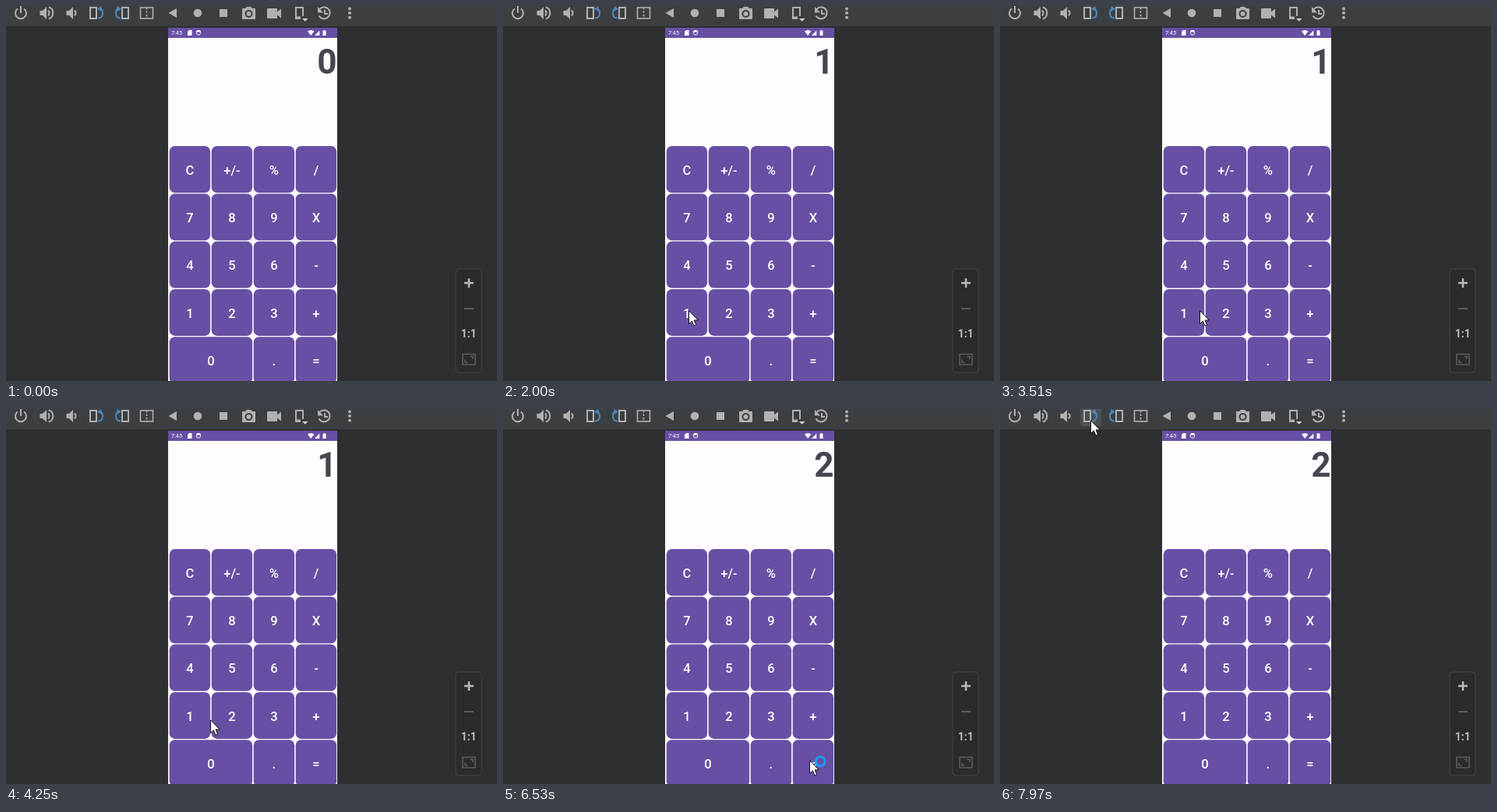
Recreate the animation shown at these times as an HTML page. Size 630 by 482 pixels, loop 8000 ms.

```html
<!DOCTYPE html>
<html lang="en">
<head>
<meta charset="utf-8">
<title>Calculator</title>
<style>
  html, body { margin: 0; width: 100%; height: 100%; overflow: hidden; background: #2e2f30; }
  svg { display: block; width: 100vw; height: 100vh; }
  text { font-family: Roboto, sans-serif; }
  .line { fill: none; stroke: #afb1b3; stroke-width: 2; }
  .solid { fill: #afb1b3; }
  .blue { fill: none; stroke: #4a88c2; stroke-width: 2; }
  .blueFill { fill: #4a88c2; }
  .dim { fill: none; stroke: #5b5c5e; stroke-width: 1.6; }
  #keys rect { fill: #6750a4; }
  #keys text { fill: #fff; font-size: 16.5px; font-weight: 500; text-anchor: middle; }
</style>
</head>
<body>
<svg viewBox="0 0 630 482">
  <defs>
    <radialGradient id="spot">
      <stop offset="0" stop-color="#fff" stop-opacity=".5"/>
      <stop offset=".8" stop-color="#fff" stop-opacity=".4"/>
      <stop offset="1" stop-color="#fff" stop-opacity=".1"/>
    </radialGradient>
    <path id="speaker" d="M0 6h3.5l5-5v16l-5-5H0z"/>
    <g id="turn">
      <rect class="line" x="108" y="2" width="8" height="14"/>
      <path class="blue" d="M118 15.5c4.500 0 6-2.500 6-6.500 0-2.500-1-4.500-3-5.500"/>
      <path class="blueFill" d="M117 3.500l5.500-3.500v7z"/>
    </g>
  </defs>

  <rect width="630" height="26" fill="#3c3f41"/>
  <rect id="hover" x="103" y="-4" width="27" height="26" rx="3" fill="#4c5052"/>

  <g id="toolbar">
    <path class="line" d="M15 3.500a7 7 0 1 0 8 0M19 0v9"/>
    <use href="#speaker" class="solid" x="43.500"/>
    <path class="line" stroke-width="1.500" d="M54 5.500q3 3.500 0 7M55 1.500c7 2 7 13 0 15"/>
    <use href="#speaker" class="solid" x="77.500"/>
    <path class="line" d="M88 5.500q3 3.500 0 7"/>
    <use href="#turn"/>
    <use href="#turn" transform="matrix(-1 0 0 1 265 0)"/>
    <rect class="line" style="stroke-width:1.600" x="172.500" y="2" width="16" height="14"/>
    <path class="line" style="stroke-width:1.600" stroke-dasharray="2.500 2" d="M180.500 2v14"/>
    <path class="solid" d="M208.500 9l10.500-6v12z"/>
    <circle class="solid" cx="246" cy="9" r="5.300"/>
    <rect class="solid" x="274" y="4" width="10" height="10"/>
    <path class="solid" fill-rule="evenodd" d="M304 3h3l2-2h5l2 2h3q1 0 1 1v12q0 1-1 1h-15q-1 0-1-1V4q0-1 1-1zM311.500 5a5 5 0 1 0 .01 0z"/>
    <circle class="solid" cx="311.500" cy="10" r="3"/>
    <path class="solid" d="M336 3h11q1 0 1 1v3.500l5-4v12l-5-4V15q0 1-1 1h-11q-1 0-1-1V4q0-1 1-1z"/>
    <path class="line" d="M378 16h-6V2h9v11"/>
    <path class="line" d="M371 14.500h7"/>
    <path fill="#d0d1d2" d="M380 16h7.500l-3.750 3.800z"/>
    <path class="line" d="M402 4.500a7.500 7.500 0 1 1-.5 8M409 5v5h4"/>
    <path class="solid" d="M400 1v7.500h7z"/>
    <g class="solid"><circle cx="441" cy="3.500" r="2"/><circle cx="441" cy="9" r="2"/><circle cx="441" cy="14.700" r="2"/></g>
  </g>

  <rect x="208" y="28" width="217" height="454" fill="#fffbff"/>
  <rect x="208" y="28" width="217" height="13" fill="#6750a4"/>
  <g fill="#fff">
    <text x="212" y="37" font-size="7.300">7:45</text>
    <path d="M235 31h3.500v7H233v-5z"/>
    <circle cx="247" cy="34.500" r="2.700" fill="none" stroke="#fff"/>
    <path d="M244 33.500h6v-1l-1.500-1.500h-3l-1.500 1.500z"/>
    <path d="M387 32.500q4.200-3 8.400 0l-4.200 5.500zM396 38l6.300-6.500V38zM406.500 32h1v-1h2v1h1v6h-4z"/>
  </g>
  <text id="display" x="424.500" y="86.500" font-size="44" font-weight="700" text-anchor="end" fill="#49454f">0</text>
  <g id="keys"></g>

  <rect x="577" y="338" width="33" height="133" rx="4" fill="#2b2b2c" stroke="#434547"/>
  <path d="M588 356h12M594 350v12" stroke="#b9babb" stroke-width="2.500"/>
  <path d="M588 389h12" class="dim" style="stroke-width:2"/>
  <text x="593.700" y="426" font-size="14" font-weight="700" text-anchor="middle" fill="#b9babb">1:1</text>
  <path class="dim" d="M586 447.500h16v13.500h-16zM595.500 450.500h3.500v3.500M592.500 458h-3.500v-3.500"/>

  <circle id="tap" r="15" fill="url(#spot)"/>
  <g id="cursor">
    <path d="M.5.8v16.700l3.800-3.600 2.700 6.200 2.700-1.200-2.600-6h5.200z" fill="#fff" stroke="#000" stroke-width=".9"/>
    <circle id="busy" cx="14.200" cy="2" r="5.900" fill="none" stroke="#1e9bf0" stroke-width="3"/>
  </g>
</svg>
<script>
const LOOP = 8000;
const $ = id => document.getElementById(id);

// Keypad
const keyRows = [["C", "+/-", "%", "/"], [7, 8, 9, "X"], [4, 5, 6, "-"], [1, 2, 3, "+"], [0, null, ".", "="]];
$("keys").innerHTML = keyRows.map((row, r) => row.map((label, c) => {
  if (label === null) return "";
  const w = label === 0 ? 106.4 : 52.4, x = 209.7 + c * 54, y = 180 + r * 61.3;
  return `<rect x="${x}" y="${y}" width="${w}" height="60" rx="7"/>` +
    `<text x="${x + w / 2}" y="${y + 36.6}">${label}</text>`;
}).join("")).join("");

// Pointer moves: first step, last step, number of steps, destination
const entry = [517, 483];
const moves = [
  [560, 840, 5, 318, 409],
  [1100, 1650, 8, 238, 391],
  [2260, 2670, 7, 394, 387],
  [3230, 3510, 5, 256, 391],
  [3580, 3650, 2, 238, 389],
  [4250, 4880, 10, 393, 451],
  [6860, 7140, 5, 181, 192],
  [7410, 7970, 9, 116, 14]
];
// Presses: down, up, gone
const taps = [[1790, 1930, 2000], [2740, 2880, 2950], [3720, 3850, 3920], [5870, 6000, 6070]];

const ease = p => Math.sin(p * Math.PI / 2);
const within = (t, a, b) => t >= a && t < b;
const show = (el, on) => el.setAttribute("visibility", on ? "visible" : "hidden");

function pointer(t) {
  let [x, y] = entry;
  for (const [start, end, steps, toX, toY] of moves) {
    if (t < start) break;
    const step = Math.min(steps - 1, Math.floor((t - start) / (end - start) * (steps - 1) + 0.01));
    const p = ease((step + 1) / steps);
    x += (toX - x) * p;
    y += (toY - y) * p;
  }
  return [Math.round(x), Math.round(y)];
}

function draw(t) {
  const [x, y] = pointer(t);
  const tap = taps.find(([down, , gone]) => within(t, down, gone));
  $("cursor").setAttribute("transform", `translate(${x} ${y})`);
  show($("cursor"), t >= 560);
  show($("busy"), within(t, 6530, 6600));
  show($("hover"), t >= 560 && within(x, 103, 130) && y < 22);
  show($("tap"), tap);
  if (tap) {
    $("tap").setAttribute("transform", `translate(${x} ${y + 1})`);
    $("tap").setAttribute("opacity", t < tap[1] ? 1 : 0.5);
  }
  $("display").textContent = t < 1930 ? "0" : t < 6000 ? "1" : "2";
}

const began = performance.now();
function tick() {
  draw((performance.now() - began) % LOOP);
  requestAnimationFrame(tick);
}
tick();
</script>
</body>
</html>
```
